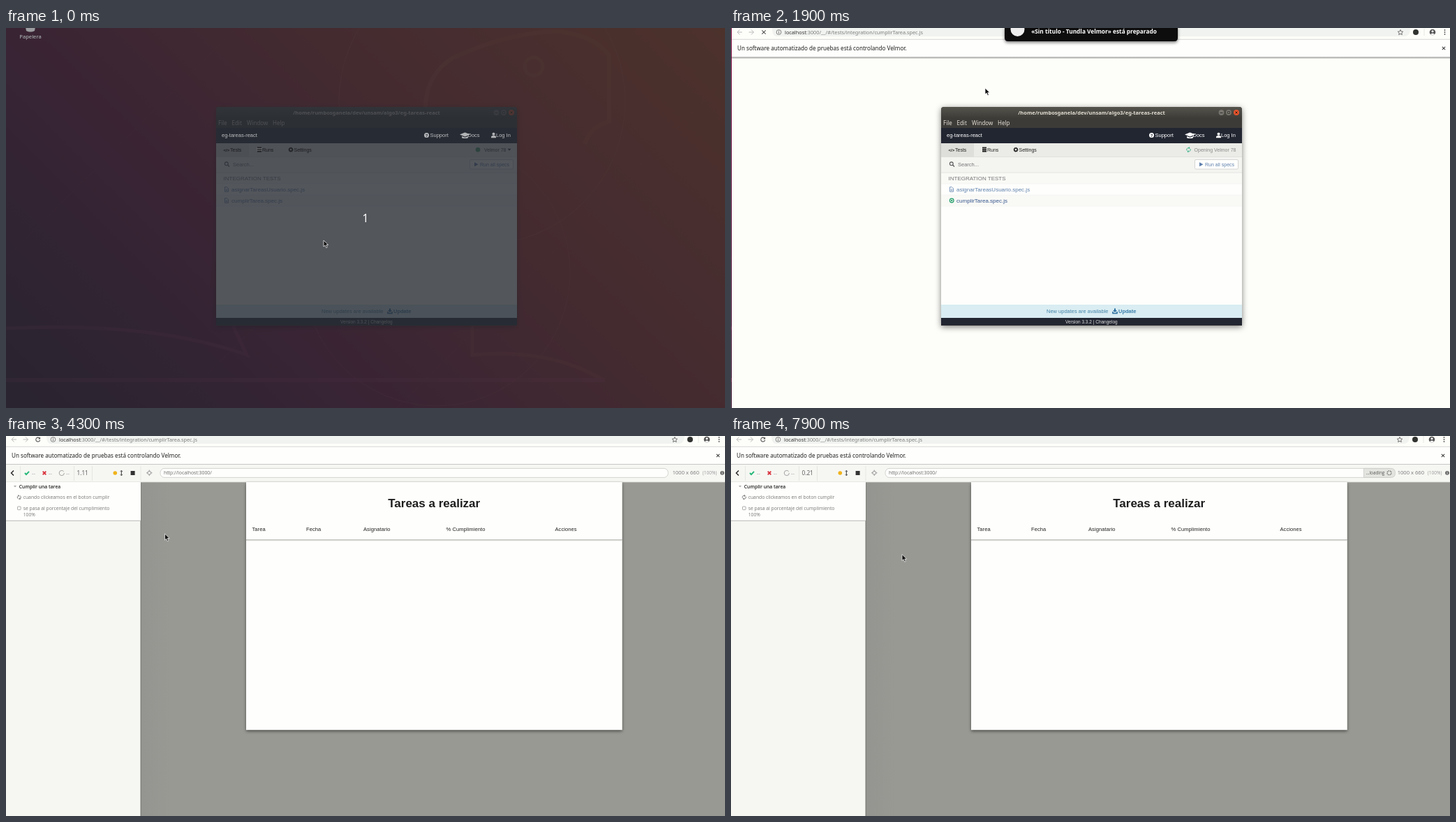
Write an HTML page that moves like this. It is 1030x544 px and loops after 8000 ms.

```html
<!DOCTYPE html>
<html lang="es">
<head>
<meta charset="utf-8">
<title>Tareas a realizar</title>
<style>
html, body { margin: 0; width: 100%; height: 100%; overflow: hidden; background: #2f0522; }
svg { display: block; width: 1030px; height: 544px; }
text { white-space: pre; }
.ui { font-family: "Liberation Sans", Arial, sans-serif; }
.desk { font-family: "Noto Sans", sans-serif; }
.run { font-family: "Open Sans", sans-serif; }
.cell { font: 7.54px "Liberation Sans", Arial, sans-serif; letter-spacing: .08px; }
.b { font-weight: 700; }
.sb { font-weight: 600; }
.mid { text-anchor: middle; }
.end { text-anchor: end; }
</style>
</head>
<body>
<svg id="stage" viewBox="0 0 1030 544"></svg>
<script>
const LOOP = 8000, STEP = 100;

const text = (x, y, s, cls, size, fill) =>
  `<text x="${x}" y="${y}" class="${cls}" font-size="${size}" fill="${fill}">${s}</text>`;
const rect = (x, y, w, h, fill, more = '') =>
  `<rect x="${x}" y="${y}" width="${w}" height="${h}" fill="${fill}" ${more}/>`;
const dot = (x, y, r, fill, more = '') =>
  `<circle cx="${x}" cy="${y}" r="${r}" fill="${fill}" ${more}/>`;
const line = (d, stroke, w = 1, more = '') =>
  `<path d="${d}" fill="none" stroke="${stroke}" stroke-width="${w}" ${more}/>`;
const shape = (d, fill, more = '') => `<path d="${d}" fill="${fill}" ${more}/>`;
const at = (x, y, body) => `<g transform="translate(${x} ${y})">${body}</g>`;
// Visible only inside the given "from-to" spans, in ms.
const on = (spans, body) => `<g data-on="${spans}">${body}</g>`;

const check = (x, y, c, w = 1.7) => line(`M${x - 3} ${y}l2 2.2l4-4.4`, c, w);
const cross = (x, y, r, c, w) => line(`M${x - r} ${y - r}l${2 * r} ${2 * r}m0 ${-2 * r}l${-2 * r} ${2 * r}`, c, w);
const reload = (x, y, r, c, w = 1.1) => at(x, y,
  line(`M${r * .8} ${-r * .6}A${r} ${r} 0 1 0 ${r} ${r * .3}`, c, w) +
  shape(`M${r * 1.15} ${-r * 1.2}v${r}h${-r}z`, c));
const sync = (x, y, r, c, w = .9) => at(x, y, [0, 180].map(a => `<g transform="rotate(${a})">` +
  line(`M${-r} -.5A${r} ${r} 0 0 1 ${r * .7} ${-r * .7}`, c, w) +
  shape(`M${r * 1.1} ${-r * 1.2}v${r}h${-r}z`, c) + '</g>').join(''));
const spinner = (x, y, r, c) => at(x, y, `<g class="spin">${sync(0, 0, r, c)}</g>`);

const papelera =
  shape('M28 -2h14l-1 6q-6 3-12 0z', '#dedede') + text(35, 15, 'Papelera', 'desk mid', 7.6, '#fff');

const desktop = rect(0, 0, 1030, 544, 'url(#wall)') +
  `<g opacity=".22">` +
  line('M601 113Q602 66 640 43Q720 6 790 5Q842 10 864 39V134Q838 140 829 166', '#ff7a42', 6) +
  dot(756, 55, 13, 'none', 'stroke="#ff8a50" stroke-width="5"') +
  line('M668 425L668 468Q780 458 856 504', '#f0604a', 5) +
  line('M0 430Q210 420 345 468L325 426', '#d03080', 5) +
  line('M0 504H858', '#d8407a', 6) +
  dot(682, 105, 205, 'none', 'stroke="#ff9060"') +
  dot(617, 350, 191, 'none', 'stroke="#ff6a60"') +
  line('M240 544L784 0M0 330L330 0M560 544L1030 74', '#ff5a50', 1, 'opacity=".4"') +
  '</g>' + papelera;

const header = text(309, 156.3, 'eg-tareas-react', 'ui', 7.5, '#fff') +
  dot(602.5, 153.5, 3.5, '#fff') + text(602.5, 155.8, '?', 'ui b mid', 6, '#222631') +
  text(607.5, 156.3, 'Support', 'ui', 7.5, '#fff') +
  shape('M650 152.5l7.5-3l7.5 3l-7.5 3zM653 155v2.2q4.500 1.800 9 0v-2.200l-4.500 1.800z', '#fff') +
  text(661.5, 156.3, 'Docs', 'ui', 7.5, '#fff') +
  dot(698.5, 151.7, 2, '#fff') + shape('M695 157.300v-1.300q0-2 3.500-2t3.500 2v1.300z', '#fff') +
  text(702, 156.3, 'Log In', 'ui', 7.5, '#fff');

const tabs = text(311.5, 176.7, '&lt;/&gt;', 'ui b', 6, '#222') +
  text(321, 176.8, 'Tests', 'ui', 7, '#222') +
  rect(360, 170.5, 6, 7, '#222') + line('M359.500 172.500h7M359.500 175h7', '#ebebe7', .6) +
  text(367, 176.8, 'Runs', 'ui', 7, '#222') +
  dot(408, 174.2, 2.1, 'none', 'stroke="#222" stroke-width="1.5"') +
  dot(408, 174.2, 3, 'none', 'stroke="#222" stroke-width="1" stroke-dasharray="1.2 1.150"') +
  text(412.5, 176.8, 'Settings', 'ui', 7, '#222');

const fileIcon = (x, y, c) => line(`M${x - 2.500} ${y - 3.300}h3l2 2v4.600h-5zM${x - 1.300} ${y}h2.600M${x - 1.300} ${y + 1.600}h2.600`, c, .8);
const specRow = (y, name, color, icon) => icon + text(323, y + 2.9, name, 'ui', 8.03, color);
const SPEC = 'cumplirTarea.spec.js';

const launcher = `<g filter="url(#winShadow)">${shape('M301 426V117q0-4 4-4h423q4 0 4 4v309z', '#3c3b37')}</g>` +
  shape('M301 129v-12q0-4 4-4h423q4 0 4 4v12z', 'url(#bar)') +
  text(516.5, 124, '/home/rumbosganela/dev/unsam/algo3/eg-tareas-react', 'desk b mid', 7.5, '#e2ded4') +
  dot(702.5, 121, 3.9, '#77756e') + line('M700.500 121.500h4', '#33322e') +
  dot(713, 121, 3.9, '#77756e') + line('M711.500 119.500h3v3h-3z', '#33322e', .8) +
  dot(724, 121, 4, '#e6542d') + cross(724, 121, 1.5, '#46200f', 1) +
  [['File', 304], ['Edit', 323.5], ['Window', 345], ['Help', 382]].map(([s, x]) => text(x, 139, s, 'desk', 8, '#e2ded4')).join('') +
  rect(301, 143, 431, 22, '#222631') + header +
  rect(301, 165, 431, 20, '#ebebe7') + rect(301, 165, 47, 20, '#dededa') + tabs +
  on('0-900', dot(676, 174.2, 3.3, '#3fa06a') + text(716.5, 176.8, 'Velmor 78', 'ui end', 7, '#333') +
    shape('M718.500 172.800h5l-2.500 3z', '#333')) +
  on('900-2100', spinner(655.5, 174.2, 2.7, '#35b389') + text(723.5, 176.8, 'Opening Velmor 78', 'ui end', 7, '#888')) +
  rect(301, 184.5, 431, 22.5, '#f4f4f1') + line('M301 184.500h431', '#d9d9d5', .6) +
  dot(315.8, 194.3, 2.4, 'none', 'stroke="#555" stroke-width="1.1"') + line('M317.500 196l2.500 2.500', '#555', 1.3) +
  text(325, 197.8, 'Search...', 'ui', 7.5, '#777') +
  rect(664.5, 188.5, 62, 13.5, '#fffffd', 'rx="1.5" stroke="#ccc" stroke-width=".8"') +
  shape('M671 192.300l5.500 3l-5.500 3z', '#5e7fad') + text(679, 197.8, 'Run all specs', 'ui', 7, '#5e7fad') +
  rect(301, 207, 431, 189, '#fefefc') + rect(301, 207, 431, 16, '#f9f9f6') + rect(301, 239, 431, 16, '#f9f9f6') +
  line('M301 207h431', '#ddd', .8) + line('M301 223h431M301 239h431M301 255h431', '#efefec', .5) +
  text(311.5, 217.8, 'INTEGRATION TESTS', 'ui', 8.03, '#777') +
  specRow(231, 'asignarTareasUsuario.spec.js', '#5f82ae', fileIcon(316, 231, '#5f82ae')) +
  on('0-600', specRow(247, SPEC, '#5f82ae', fileIcon(316, 247, '#5f82ae'))) +
  on('600-900', specRow(247, SPEC, '#34558c', fileIcon(316, 247, '#34558c'))) +
  on('900-2100', specRow(247, SPEC, '#34558c', dot(316.2, 247, 2.8, 'none', 'stroke="#1c9c66" stroke-width="1.2"') + dot(316.2, 247, 1.2, '#1c9c66'))) +
  rect(301, 396, 431, 19, '#d9edf2') + text(452, 407.8, 'New updates are available', 'ui', 7.5, '#4583a8') +
  line('M547 406v2.500h6v-2.500', '#2d70a0', 1.6) + shape('M549 401.500h2v2.500h2l-3 3l-3-3h2z', '#2d70a0') +
  text(555, 407.8, 'Update', 'ui b', 7.5, '#3a7eab') +
  rect(301, 415, 431, 10.5, '#222631') + text(516.3, 422.5, 'Version 3.3.2 | Changelog', 'ui mid', 6.5, '#ddd');

const browser = rect(0, -40, 1032, 590, '#fdfdf9') +
  on('2900-8000', rect(0, 41, 1030, 503, '#f5f5f1')) +
  shape('M64 -12h900q8 0 8 11.500t-8 11.500h-900q-6 0-6-11.500t6-11.500z', '#f1f3f0') +
  line('M15 5H8M11.500 1.500L8 5l3.500 3.500M24.500 5h7M28 1.500L31.500 5L28 8.500', '#bbbdbb', 1) +
  on('1800-2900', cross(46, 5, 2.7, '#555', 1.1)) + on('2900-8000', reload(45.7, 5, 3, '#555')) +
  dot(67.5, 5, 3.4, 'none', 'stroke="#666" stroke-width=".8"') + line('M67.500 4.500v2.500M67.500 2.800v1', '#666', .9) +
  `<text x="76" y="7.5" class="desk" font-size="7.29" fill="#333">localhost<tspan fill="#7c7e7c">:3000/__/#/tests/integration/cumplirTarea.spec.js</tspan></text>` +
  line('M958 1.500l1.100 2.400l2.600.3l-1.900 1.800l.5 2.600l-2.300-1.300l-2.300 1.300l.5-2.600l-1.900-1.800l2.600-.3z', '#555', .8) +
  dot(980, 5, 4, '#30332f') + line('M992 0v10', '#ddd', .7) +
  dot(1004, 5, 4.3, '#555') + dot(1004, 3.7, 1.5, '#fff') + shape('M1001 8q3-3 6 0q-3 2-6 0z', '#fff') +
  [2, 5, 8].map(y => dot(1021.5, y, .9, '#555')).join('') +
  rect(0, 15, 1032, 26, '#fefefc') + line('M0 15.300h1032', '#cfd0cd', .8) +
  text(8, 31, 'Un software automatizado de pruebas está controlando Velmor.', 'desk', 8.1, '#202220') +
  cross(1020, 28, 2.2, '#444', 1.1) + rect(0, 40.5, 1032, 3, 'url(#edge)');

const notice = shape('M392 -2h248v16q0 5-5 5h-238q-5 0-5-5z', '#0b080b', 'filter="url(#soft)"') +
  dot(410.5, 2, 10, '#eee') +
  text(520, 8.3, '«Sin título - Tundla Velmor» está preparado', 'desk b mid', 8.3, '#fff');

const person = (x, y) => rect(x - 5, y - 5, 10, 10, '#666', 'rx="1.2"') + dot(x, y - 1.6, 1.6, '#fefefc') +
  shape(`M${x - 3.300} ${y + 3.400}q0-2.500 3.300-2.500t3.300 2.500z`, '#fefefc');
const tick = (x, y) => dot(x, y, 5.5, '#666') + check(x - .4, y + .2, '#fefefc', 1.2);
const badge = (y, pct, color) => dot(747.2, y, 10.8, color) + text(747.2, y + 2, pct, 'ui mid', 6, '#ffffffd8');
const cells = (y, xs, words) => words.map((s, i) => `<text x="${xs[i]}" y="${y + 2.7}" class="cell" fill="#222">${s}</text>`).join('');
const HEADS = ['Tarea', 'Fecha', 'Asignatario', '% Cumplimiento', 'Acciones'];
const COLS = [352.5, 597.7, 658, 736.8, 816];
const lastTask = y => cells(y, COLS, ['Cancelar pedidos que esten pendientes desde hace 2 meses', '30/06/2018', 'Esteban Maruldez']);
const tableEnd = y => line(`M344 ${y}h539`, '#a9a9a6', 1.2) + line(`M344 ${y + 1}h539`, '#e2e2df', 1);

const table = cells(133, COLS, HEADS) +
  line('M344 148.500h539M344 192h539M344 235.500h539M344 279h539', '#dededb', .8) +
  cells(170.3, COLS, ['Desarrollar componente de envio de mails', '14/11/2019', 'Luis Verandel']) + tick(829, 170.3) + person(855, 170.3) +
  cells(213.8, COLS, ['Implementar single sign on desde la extranet', '09/09/2018']) + badge(213.8, '75%', '#f6dc10') + person(829, 213.8) +
  cells(257.3, COLS, ['Mostrar info del pedido cuando esta finalizado', '10/08/2018']) + badge(257.3, '90%', '#0b910d') + person(829, 257.3) +
  on('4500-4700', lastTask(301) + tick(829, 301) + person(855, 301) + tableEnd(322.5)) +
  on('4700-7600', lastTask(299) + badge(299, '100%', '#0b910d') + tableEnd(319.3));

const GREEN = '#1fb574', MUTED = '#777975';
const BUSY = '3200-4900,7600-8000', DONE = '4900-7600';
const testLine = (y, s) => text(24.7, y, s, 'run', 6.8, MUTED);

const suite = rect(0, 66, 193, 55, '#fefefc') +
  on('6200-6500', rect(5, 80, 188, 41, '#f3f4f1')) +
  line('M0 121.300h193', '#bbbcb8', 1) + shape('M11 71h4l-2 2.500z', '#aaa') +
  text(18.8, 74.8, 'Cumplir una tarea', 'run sb', 6.8, '#222') +
  testLine(90, 'cuando clickeamos en el boton cumplir') + testLine(105.8, 'se pasa al porcentaje del cumplimiento') + testLine(115.3, '100%') +
  on('3300-4700,7700-8000', spinner(18.8, 87.7, 2.5, '#777') + rect(16.5, 101, 4.6, 4.6, 'none', 'rx=".8" stroke="#999" stroke-width=".8"')) +
  on('4700-7600', check(18.7, 87.7, GREEN, 1.4)) +
  on('4700-4900', spinner(18.8, 103.4, 2.5, '#777')) +
  on(DONE, check(18.7, 103.4, GREEN, 1.4) + rect(0, 66, 5, 55, '#1fcb8b'));

const dashes = x => text(x, 55.6, '--', 'run', 7.6, '#999');
const aim = c => dot(205.3, 52.8, 2.6, 'none', `stroke="${c}" stroke-width=".9"`) + line('M201 52.800h3M206.600 52.800h3M205.300 48.500v3M205.300 54.100v3', c, .9);

const runner = rect(0, 41, 1030, 25, '#f6f7f3') + rect(0, 66, 193, 478, '#f6f7f3') +
  rect(193, 66, 837, 478, 'url(#floor)') + rect(192.5, 66, 1.5, 478, '#80807c') + line('M0 66h1030', '#cdcec9', .8) +
  line('M20.500 43v21M97.500 43v21M123.500 43v21M193 43v21', '#dfe0db', .7) +
  line('M11 49.500L7.500 53l3.500 3.500', '#222', 1.4) +
  check(30, 53, GREEN, 1.9) + cross(55, 53, 2.3, '#d8323c', 1.9) +
  dot(79.8, 53, 3.6, 'none', 'stroke="#999" stroke-width=".9" stroke-dasharray="20 2.600"') +
  on('3200-4700,7600-8000', dashes(37)) + on('4700-4900', text(37.5, 55.7, '1', 'run', 7.6, '#777')) +
  on(DONE, text(37.5, 55.7, '2', 'run', 7.6, '#777')) + dashes(61) + dashes(86) +
  '<text id="timer" x="109.7" y="55.900" class="run mid" font-size="8.2" fill="#555"></text>' +
  dot(156.3, 53, 2.8, '#f0b31c') + line('M165.300 50v6M163.800 50.800l1.500-1.500l1.500 1.500M163.800 55.200l1.500 1.500l1.500-1.500', '#333', 1) +
  on(BUSY, rect(178.6, 50, 6, 6, '#333') + aim('#999')) + on(DONE, reload(181.5, 53, 3, '#222', 1.3) + aim('#333')) +
  rect(221, 46.4, 727.5, 13, '#fefefc', 'rx="6" stroke="#c9cac6" stroke-width=".8"') +
  text(226, 55.2, 'http://localhost:3000/', 'run', 6.85, '#666') +
  on('3300-3900,7700-8000', shape('M906.500 46.400h39q6 0 6 6.500t-6 6.500h-39z', '#e3e4df', 'stroke="#c9cac6" stroke-width=".8"') +
    text(909.5, 55.2, '...loading', 'run', 6.3, '#555') +
    at(943, 52.8, `<g class="spin">${dot(0, 0, 3, 'none', 'stroke="#555" stroke-width="1.2" stroke-dasharray="1.300 1.060"')}</g>`)) +
  text(954.7, 55.4, '1000 x 660', 'run', 7.6, '#777') + text(997.7, 55.4, '(100%)', 'run', 6.6, '#999') +
  dot(1026, 52.8, 2.9, '#666') + line('M1026 52.500v2M1026 50.800v.9', '#fff', .9) +
  on('3300-7600,7700-8000', suite) +
  `<g filter="url(#soft)">${rect(344, 66, 538.7, 354.7, '#fefefc')}</g>` +
  on('3500-7600,7800-8000', text(613.2, 102, 'Tareas a realizar', 'ui b mid', 17, '#1d1d1d')) +
  on('3500-4500,7800-8000', cells(133, [352.5, 430, 512, 630.5, 786.5], HEADS) + tableEnd(148.8)) +
  on('4500-7600', table);

const arrow = shape('M0 0v9l2.100-1.900l1.600 3.500l1.600-.8l-1.500-3.300h2.900z', '#111', 'stroke="#fff" stroke-width=".7"');
const hand = shape('M0 .5q1-1 1.700.3l.6 2l3.200.4q1.200.300.900 2l-.6 3.300h-4.300l-2.300-3.200q-.200-1.300 1.200-.5z', '#111', 'stroke="#fff" stroke-width=".5"');

const stops = list => list.map(([o, c, a = 1]) => `<stop offset="${o}" stop-color="${c}" stop-opacity="${a}"/>`).join('');
const shadow = (id, dy, blur, a) => `<filter id="${id}" x="-10%" y="-30%" width="120%" height="170%"><feDropShadow dx="0" dy="${dy}" stdDeviation="${blur}" flood-opacity="${a}"/></filter>`;

const stage = document.getElementById('stage');
stage.innerHTML = `<defs>
  <linearGradient id="wall" gradientUnits="userSpaceOnUse" x1="0" y1="544" x2="787" y2="-243">${stops([[0, '#2c0420'], [.18, '#53032f'], [.34, '#7c0338'], [.5, '#a11a2c'], [.66, '#b92b21'], [.83, '#cd3a18'], [1, '#de4a0c']])}</linearGradient>
  <linearGradient id="bar" x2="0" y2="1">${stops([[0, '#55534c'], [1, '#3d3c37']])}</linearGradient>
  <linearGradient id="edge" x2="0" y2="1">${stops([[0, '#777', .8], [1, '#777', 0]])}</linearGradient>
  <linearGradient id="floor" x2="1" y2="0">${stops([[0, '#949490'], [.05, '#999994'], [1, '#999994']])}</linearGradient>
  ${shadow('winShadow', 2, 4, .5)}${shadow('soft', 2, 2, .5)}
</defs>
${on('0-2000', desktop)}
${on('2000-8000', rect(0, 0, 1030, 544, '#fdfdf9'))}
<g id="browser">${on('1800-8000', browser)}</g>
${on('0-2100', launcher)}
${on('1900-2300', `<g id="notice">${notice}</g>`)}
${on('3200-8000', runner)}
<g id="veil">${rect(0, 0, 1030, 544, '#282c34')}</g>
${on('0-100', `<g opacity=".55">${papelera}${header}${tabs}</g>` + text(515, 277.5, '1', 'desk mid', 15.5, '#fff'))}
<g id="cursor">${on('0-2900,3600-6200,7600-8000', arrow)}${on('2900-3600,6200-7600', hand)}</g>`;

const find = id => document.getElementById(id);
const [browserEl, noticeEl, veil, cursor, timer] = ['browser', 'notice', 'veil', 'cursor', 'timer'].map(find);
const spins = stage.querySelectorAll('.spin');
const parts = [...stage.querySelectorAll('[data-on]')].map(el =>
  ({ el, spans: el.dataset.on.split(',').map(s => s.split('-').map(Number)) }));

// time, x, y of the pointer tip
const track = [[0, 455, 304], [100, 455, 304], [400, 733, 265], [500, 733, 265], [700, 560, 247], [900, 560, 247],
  [1700, 310, 102], [1900, 364, 86], [2100, 344, 71], [2400, 344, 71], [2700, 324, 39], [2800, 324, 39], [3000, 152.5, 44],
  [3500, 160, 60], [4300, 227.5, 140], [4600, 265, 173], [5100, 265, 173], [5300, 258.5, 173.5], [5500, 258.5, 172.5],
  [5600, 258.5, 172.5], [6000, 245, 165], [6200, 185, 119], [6300, 185, 119], [6600, 181, 50], [7500, 181, 50], [7900, 245, 169.5], [8000, 245, 169.5]];

function pointer(t) {
  const i = track.findIndex(k => k[0] > t);
  const [t0, x0, y0] = track[i - 1], [t1, x1, y1] = track[i];
  const f = (t - t0) / (t1 - t0);
  return [x0 + (x1 - x0) * f, y0 + (y1 - y0) * f];
}

function clock(t) {
  if (t >= 7600 && t < 7700 || t < 3200) return '--';
  const elapsed = t >= 7700 ? t - 7700 : Math.min(t, 4900) - 3200;
  return (elapsed / 1000 + .01).toFixed(2);
}

function draw(t) {
  for (const { el, spans } of parts)
    el.style.display = spans.some(([a, b]) => t >= a && t < b) ? '' : 'none';
  veil.setAttribute('opacity', Math.max(0, .8 - t / 500));
  cursor.setAttribute('transform', `translate(${pointer(t)})`);
  const opening = t < 1900;
  browserEl.setAttribute('opacity', opening ? .6 : 1);
  browserEl.setAttribute('transform', opening ? 'translate(20 12) scale(.96)' : t < 2000 ? 'translate(1 1)' : '');
  noticeEl.setAttribute('opacity', t < 2200 ? 1 : .5);
  spins.forEach(el => el.setAttribute('transform', `rotate(${t * .36 % 360})`));
  timer.textContent = clock(t);
}

function frame(now) {
  draw(Math.floor(now % LOOP / STEP) * STEP);
  requestAnimationFrame(frame);
}
draw(0);
requestAnimationFrame(frame);
</script>
</body>
</html>
```
